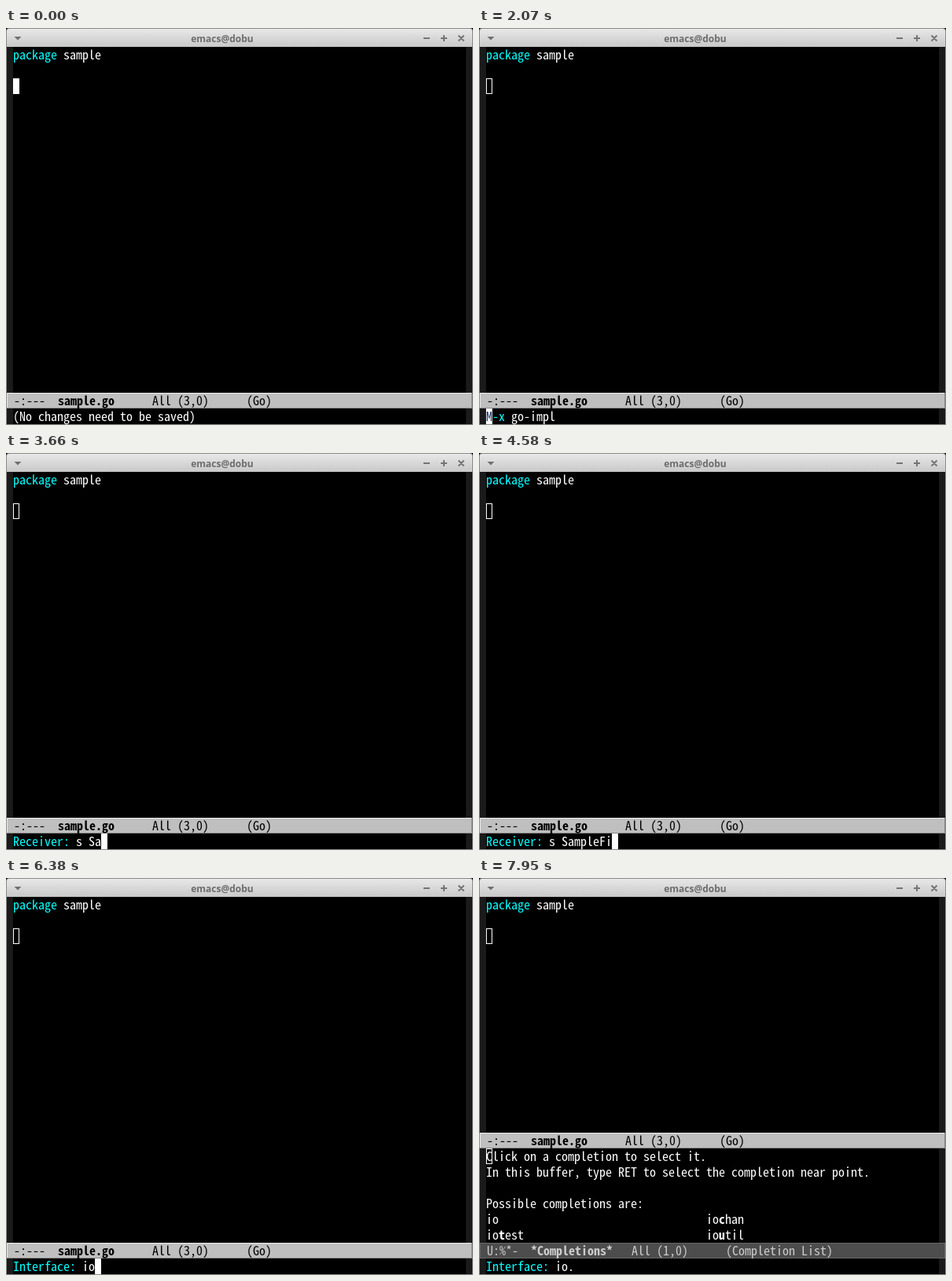
Recreate the animation shown at these times as an HTML page. Size 594x505 px, loop 8000 ms.

```html
<!DOCTYPE html>
<html lang="en">
<head>
<meta charset="utf-8">
<title>Editor session</title>
<style>
  html, body { margin: 0; width: 100%; height: 100%; overflow: hidden; background: #000; }
  svg { display: block; }
  text { white-space: pre; fill: #fff; }
  .mono {
    font-family: "Noto Sans Mono CJK JP", "Noto Sans Mono", "DejaVu Sans Mono", monospace;
    font-size: 16px; font-variant-ligatures: none; font-kerning: none;
  }
  .title { font: bold 12px "Open Sans", "Noto Sans", sans-serif; fill: #6c6c6c; text-anchor: middle; }
  .key { fill: #0ff; }
  .b { font-weight: bold; }
  .bar text { fill: #000; }
  .idle text { fill: #ccc; }
  .hollow { fill: none; stroke: #fff; }
</style>
</head>
<body>
<svg width="594" height="505" viewBox="0 0 594 505">
  <defs>
    <linearGradient id="chrome" x2="0" y2="1">
      <stop offset="0" stop-color="#e8e8e8"/>
      <stop offset="1" stop-color="#c8c8c8"/>
    </linearGradient>
  </defs>

  <!-- window frame -->
  <path d="M0 505V4Q0 0 4 0H590Q594 0 594 4V505Z" fill="#8a8a8a"/>
  <path d="M1 24V4Q1 1 4 1H590Q593 1 593 4V24Z" fill="url(#chrome)"/>
  <path d="M10.5 11H19.5L15 15.5Z" fill="#707070"/>
  <path d="M531 13H539M553 13H561M557 9V17M575.5 9.5L582.5 16.5M582.5 9.5L575.5 16.5"
        fill="none" stroke="#747474" stroke-width="2"/>
  <text class="title" x="275" y="18">emacs@dobu</text>

  <rect x="1" y="24" width="592" height="480" fill="#1a1a1a"/>
  <rect x="9" y="24" width="576" height="480"/>

  <g class="mono">
    <text x="9" y="40"><tspan class="key">package</tspan> sample</text>
    <rect id="point" x="9" y="64" width="8" height="20" fill="#fff"/>
    <rect class="hollow" x="9.5" y="64.5" width="7" height="19"/>

    <g id="list">
      <text x="9" y="360">Click on a completion to select it.</text>
      <text x="9" y="380">In this buffer, type RET to select the completion near point.</text>
      <text x="9" y="420">Possible completions are:</text>
      <text x="9" y="440">io</text>
      <text x="289" y="440">io<tspan class="b">c</tspan>han</text>
      <text x="9" y="460">io<tspan class="b">t</tspan>est</text>
      <text x="289" y="460">io<tspan class="b">u</tspan>til</text>
      <rect class="hollow" x="9.5" y="344.5" width="7" height="19"/>
      <g class="idle">
        <rect x="1.5" y="464.5" width="591" height="19" fill="#4d4d4d" stroke="#666"/>
        <text x="10" y="480">U:%*-  <tspan class="b">*Completions*</tspan>   All (1,0)      (Completion List)</text>
      </g>
    </g>

    <g id="bar" class="bar">
      <rect x="1" y="464" width="592" height="20" fill="#bfbfbf"/>
      <path d="M1.5 484V464.5H593" fill="none" stroke="#ececec"/>
      <path d="M1 483.5H592.5V464" fill="none" stroke="#858585"/>
      <text x="10" y="480">-:---  <tspan class="b">sample.go</tspan>      All (3,0)      (Go)</text>
    </g>

    <rect id="caret" y="484" width="8" height="20" fill="#fff"/>
    <text x="9" y="500"><tspan id="first"></tspan><tspan id="prompt" class="key"></tspan><tspan id="input"></tspan></text>
  </g>
</svg>
<script>
const LOOP = 8000, CELL = 8, LEFT = 9, LIST_AT = 6420;
const $ = id => document.getElementById(id);

// Pick the font size whose advance is exactly one cell.
const mono = document.querySelector(".mono");
const pen = document.createElement("canvas").getContext("2d");
pen.font = "100px " + getComputedStyle(mono).fontFamily;
mono.style.fontSize = CELL * 100 / pen.measureText("0").width + "px";

// Each step: time, prompt, input, caret column (-1 hides it).
const steps = [];
const END = undefined;
const add = (t, prompt, input, col = prompt.length + input.length) =>
  steps.push({ t, prompt, input, col });
const type = (prompt, before, keys, times) =>
  times.forEach((t, i) => add(t, prompt, before + keys.slice(0, i + 1)));

add(0, "", "(No changes need to be saved)", -1);
add(460, "M-x ", "");
type("M-x ", "", "go-impl", [780, 940, 1100, 1270, 1430, 1590, 1750]);
add(2070, "M-x ", "go-impl", 0);

const recv = "Receiver: ";
add(2230, recv, "");
type(recv, "", "s ", [2450, 2600]);
add(3110, recv, "s ", -1);
type(recv, "s ", "SampleFile", [3470, 3660, 3730, 3850, 3960, 4080, 4300, 4580, 4720, 4830]);

const face = "Interface: ";
add(5010, face, "");
type(face, "", "io", [5450, 5650]);
add(6150, face, "io", -1);
add(6290, face, "io", END);
add(6910, face, "io", -1);
add(7410, face, "io", END);
add(7460, face, "io.", END);
add(7950, face, "io.", -1);

function draw(t) {
  const { prompt, input, col } = steps.findLast(s => s.t <= t);
  const covered = col === 0 ? 1 : 0;
  $("first").textContent = prompt.slice(0, covered);
  $("first").style.fill = "#0a2a5c";
  $("prompt").textContent = prompt.slice(covered);
  $("input").textContent = input;
  $("caret").setAttribute("x", LEFT + col * CELL);
  $("caret").style.display = col < 0 ? "none" : "";
  $("point").style.display = t < 460 ? "" : "none";

  const open = t >= LIST_AT;
  $("list").style.display = open ? "" : "none";
  $("bar").setAttribute("transform", `translate(0 ${open ? -140 : 0})`);
}

const start = performance.now();
function tick() {
  draw((performance.now() - start) % LOOP);
  requestAnimationFrame(tick);
}
tick();
</script>
</body>
</html>
```
